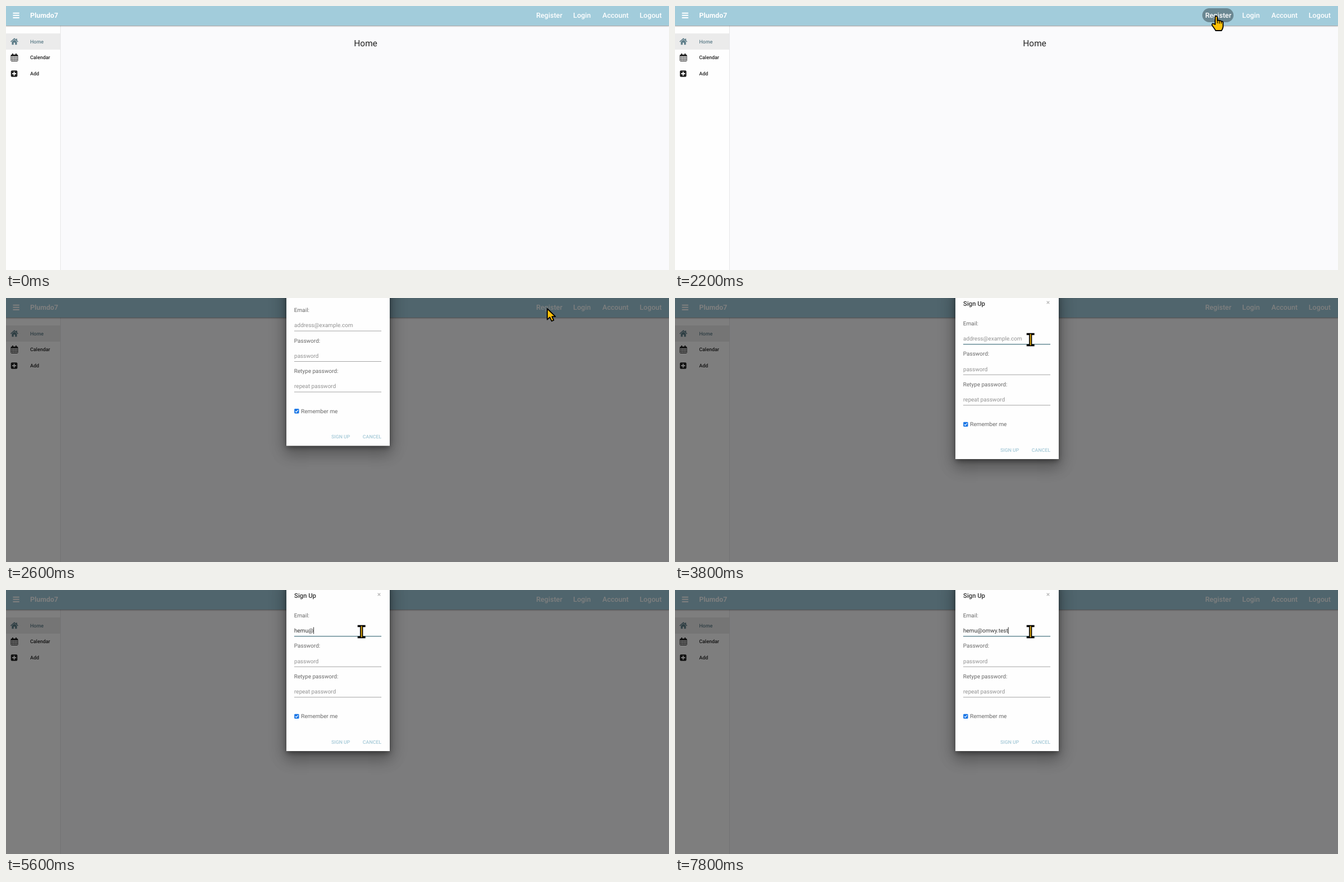
An HTML page that plays this animation: 1187x472 px, repeating every 8000 ms.

```html
<!DOCTYPE html>
<html lang="en">
<head>
<meta charset="utf-8">
<title>Sign up</title>
<style>
html, body { margin: 0; width: 100%; height: 100%; overflow: hidden; }
body { position: relative; background: #fafafc; }
div, svg { position: absolute; left: 0; top: 0; }
svg { width: 1187px; height: 472px; overflow: visible;
  font: 10.05px Roboto, sans-serif; text-rendering: geometricPrecision; }
#side { width: 97px; height: 472px; background: #fefefe; border-right: 1px solid #e6e6e8; }
#bar { width: 1187px; height: 35px; background: #a2ccdb;
  box-shadow: 0 1px 1px rgba(0,0,0,.22), 0 1px 3px rgba(0,0,0,.2); }
#dim { width: 1187px; height: 472px; background: #000; }
#card { left: 501.5px; top: -20px; width: 185px; height: 308px; background: #fefefe;
  box-shadow: 0 3px 9px rgba(0,0,0,.35), 0 6px 29px 5px rgba(0,0,0,.14),
    0 7px 9px -4px rgba(0,0,0,.12), 0 15px 24px 2px rgba(0,0,0,.2); }
.nav { font-size: 12.6px; font-weight: 500; fill: #fff; }
.menu { font-size: 8.95px; font-weight: 500; fill: #222; }
.label { fill: #686868; }
.hint { fill: #929292; }
.line { stroke: #a4a4a4; }
.button { font-size: 8.8px; font-weight: 500; fill: #a6cad8; }
</style>
</head>
<body>
<div id="side"></div>
<div id="bar"></div>
<svg>
  <rect id="pill" x="944" y="4" width="56" height="25" rx="12.5" fill="#6a8792"/>
  <path d="M12.5 12.7h11.3m-11.3 4.1h11.3m-11.3 4.1h11.3" stroke="#fff" stroke-width="2"/>
  <g class="nav">
    <text x="43.3" y="21.3" font-size="12.4" font-weight="700">Plumdo7</text>
    <text x="949.2" y="21.3">Register</text>
    <text x="1015.6" y="21.3">Login</text>
    <text x="1067.8" y="21.3">Account</text>
    <text x="1134.5" y="21.3">Logout</text>
  </g>
  <rect y="49" width="97" height="29" fill="#ebebeb"/>
  <g fill="#5c7c88">
    <path d="M8.5 64L15 58.3 21.5 64" fill="none" stroke="#5c7c88" stroke-width="1.6"/>
    <path d="M18 58.5h2v3.5l-2-2zM10.5 64L15 60.2 19.5 64v5.2h-3.2v-3.6h-2.6v3.6h-3.2z"/>
  </g>
  <g fill="none" stroke="#222">
    <rect x="9" y="87.2" width="12" height="11.3" rx="1"/>
    <path d="M9 88.6h12" stroke-width="2.6"/>
    <path d="M12 85v3M18 85v3" stroke-width="2"/>
    <path d="M12 90v8m3-8v8m3-8v8M9 92.7h12M9 95.5h12" stroke-width=".7"/>
  </g>
  <rect x="8.8" y="115.2" width="11.6" height="11.6" rx="2" fill="#222"/>
  <path d="M11 121h7.2M14.6 117.4v7.2" stroke="#fff" stroke-width="2"/>
  <g class="menu" id="menu"></g>
  <text x="623" y="72" font-size="15.5" fill="#222">Home</text>
</svg>
<div id="dim"></div>
<div id="modal">
  <div id="card"></div>
  <svg>
    <text x="516" y="13.6" font-size="11.4" font-weight="500" fill="#333">Sign Up</text>
    <text x="664.8" y="12.2" font-size="12" font-weight="700" fill="#bcbcbc">×</text>
    <g id="fields"></g>
    <path id="focus" d="M516 82.7h156" stroke="#56808d" stroke-width="1.3"/>
    <text id="typed" x="516" y="76" fill="#333"></text>
    <path id="caret" d="M0 66.5v12" stroke="#222"/>
    <rect x="516.2" y="221.7" width="8.4" height="8.4" rx="1.4" fill="#1976e6"/>
    <path d="M518 226l1.7 1.7 3.3-3.8" fill="none" stroke="#fff" stroke-width="1.2"/>
    <text class="label" x="528.3" y="229.3">Remember me</text>
    <text class="button" x="582.4" y="274.6">SIGN UP</text>
    <text class="button" x="638.6" y="274.6">CANCEL</text>
  </svg>
</div>
<svg>
  <g id="cursor" fill="#ffc107" stroke="#000" stroke-width="1.8" stroke-linejoin="round">
    <path id="arrow" d="M0 1V20.5L4.6 16.4 8 23.3 11.6 21.6 8.4 15.2H14.6Z"/>
    <g id="hand">
      <path d="M-2 15V2a2 2 0 0 1 4 0V8q2-1.3 3.5.5 2-1 3.5.9 3-.4 3.3 2.2V19q-.6 4-2.8 7H-1Q-3 22.5-7.5 16.5-8 12.5-5 13.5Z"/>
      <path d="M2 8v5m3.5-4v4.500m3.500-4v4" stroke-width="1.300"/>
    </g>
    <g id="beam" fill="none">
      <path d="M-6.500-9.500h14M-6.500 10.500h14" stroke-width="3.600"/>
      <path d="M.5-10v21" stroke-width="5.400"/>
      <path d="M.5-9.500v20" stroke="#e9b010" stroke-width="2"/>
    </g>
  </g>
</svg>
<script>
const LOOP = 8000, STEP = 200, FIELD_GAP = 54.5, MENU_GAP = 28.65;
const NAME = 'hemu@', HOST = 'omwy.test';
const ENTRY = [626, 184], LINK = [969, 18], INPUT = [636, 74];
const $ = id => document.getElementById(id);
const show = (id, on) => { $(id).style.display = on ? 'inline' : 'none'; };

$('menu').innerHTML = ['Home', 'Calendar', 'Add'].map((label, i) =>
  `<text x="43.2" y="${66.7 + i * MENU_GAP}" ${i ? '' : 'fill="#607f8b"'}>${label}</text>`).join('');

$('fields').innerHTML = [
  ['Email:', 'address@example.com'],
  ['Password:', 'password'],
  ['Retype password:', 'repeat password'],
].map(([label, hint], i) => `<g transform="translate(516 ${i * FIELD_GAP})">
  <text class="label" x="-.3" y="48.8">${label}</text>
  <text class="hint" y="76">${hint}</text>
  <path class="line" d="M0 82.7h156"/></g>`).join('');
const emailHint = $('fields').querySelector('.hint');

const progress = (t, from, to) => Math.min(1, Math.max(0, (t - from) / (to - from)));
const mix = (a, b, k) => a.map((v, i) => v + (b[i] - v) * k);
const smooth = u => u * u * (3 - 2 * u);
const overshoot = u => 1 + 2.7 * (u - 1) ** 3 + 1.7 * (u - 1) ** 2;
const letters = (text, t, from, to) => text.slice(0, Math.floor(text.length * progress(t, from, to)));

function draw(now) {
  const t = Math.floor(now % LOOP / STEP) * STEP;
  const hover = t >= 1200 && t < 2400, open = t >= 2600, beam = t >= 3400;

  const [x, y] = open
    ? mix(LINK, INPUT, smooth(progress(t, 2600, 3600)))
    : mix(ENTRY, LINK, overshoot(progress(t, 200, 1400)));
  $('cursor').setAttribute('transform', `translate(${x} ${y})`);
  show('arrow', t >= 200 && !hover && !beam);
  show('hand', hover);
  show('beam', beam);
  show('pill', hover);

  $('dim').style.opacity = t < 2400 ? 0 : open ? .5 : .38;
  show('modal', open);
  $('modal').style.transform = `translateY(${t < 2800 ? -23.7 : 0}px)`;

  const email = letters(NAME, t, 4600, 5600) + letters(HOST, t, 5800, 7800);
  $('typed').textContent = email;
  emailHint.style.display = email ? 'none' : 'inline';
  show('focus', t >= 3600);
  show('caret', email || (t >= 4000 && t < 4600));
  const width = email ? $('typed').getComputedTextLength() : 0;
  $('caret').setAttribute('transform', `translate(${516.5 + width} 0)`);
}

const start = performance.now();
(function tick() {
  draw(performance.now() - start);
  requestAnimationFrame(tick);
})();
</script>
</body>
</html>
```
